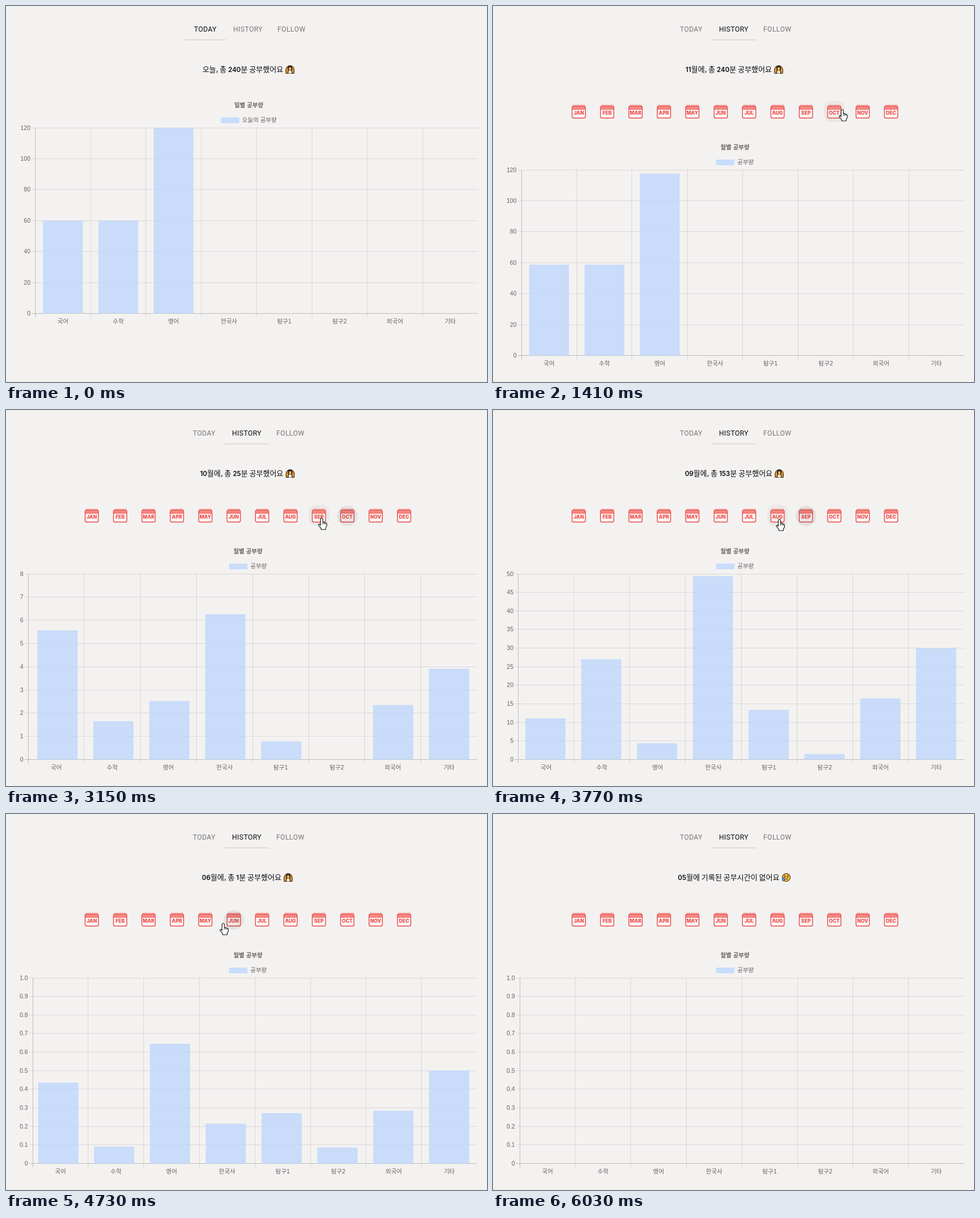
Recreate the animation shown at these times as an HTML page with a canvas. Size 847 by 661 pixels, loop 6.23 s.

```html
<!DOCTYPE html>
<html lang="ko">
<head>
<meta charset="utf-8">
<title>공부량</title>
<style>
  html, body { margin: 0; width: 100%; height: 100%; overflow: hidden; background: #f4f2f1; }
  canvas { display: block; }
</style>
</head>
<body>
<canvas id="stage" width="847" height="661"></canvas>
<script>
const ctx = document.getElementById("stage").getContext("2d");
const LOOP = 6230, TAB_CLICK = 600, HIDE_CURSOR = 6000;
const BASE = 614.5, HEIGHT = 326.5, RIGHT = 829.5;
const KOREAN = '"Noto Sans CJK KR", "Noto Sans CJK", sans-serif';
const CHART_FONT = '10.5px "Liberation Sans", ' + KOREAN;
const SUBJECTS = ["국어", "수학", "영어", "한국사", "탐구1", "탐구2", "외국어", "기타"];
const MONTHS = ["JAN", "FEB", "MAR", "APR", "MAY", "JUN", "JUL", "AUG", "SEP", "OCT", "NOV", "DEC"];

const phases = [
  { at: 643, dur: 1236, month: "11", total: 240, left: 50, max: 120, step: 20, data: [60, 60, 120, 0, 0, 0, 0, 0] },
  { at: 2759, dur: 1236, month: "10", total: 25, left: 39, max: 8, step: 1, data: [6, 1, 1, 8, 1, 0, 3, 5] },
  { at: 3418, dur: 1236, month: "09", total: 153, left: 44.5, max: 50, step: 5, data: [2, 34, 3, 50, 16, 2, 16, 30] },
  { at: 3850, dur: 800, month: "08", total: 111, left: 44.5, max: 40, step: 5, data: [17, 0, 31, 20, 14, 3, 21, 4] },
  { at: 4110, dur: 1236, month: "07", total: 23, left: 39, max: 6, step: 1, data: [5, 1, 2, 2, 3, 1, 3, 6] },
  { at: 4570, dur: 1236, month: "06", total: 1, left: 47, max: 1, step: 0.1, data: [0, 0, 1, 0, 0, 0, 0, 0] },
  { at: 5250, dur: 780, month: "05", total: 0, left: 47, max: 1, step: 0.1, data: [0, 0, 0, 0, 0, 0, 0, 0] }
];

// time, x, y of the fingertip
const cursorPath = [
  [200, 446, 7], [460, 426, 38], [890, 426, 38], [1290, 628, 178], [1410, 615, 182], [1850, 611, 184],
  [2030, 611, 184], [2600, 606, 188], [2780, 604, 188], [3100, 556, 190], [3420, 554, 191],
  [3720, 505, 192], [3860, 503, 192], [4030, 452, 193], [4120, 450, 194], [4340, 396, 194],
  [4560, 398, 193], [4980, 355, 191], [5240, 354, 191], [6000, 353, 192]
];
const clicks = [[2690, 9], [3380, 8], [3800, 7], [4060, 6], [4500, 5], [5210, 4]];
const HAND = new Path2D("M-2 2Q-2 0 0 0T2 2V7Q4 6 4.5 8Q6 7 7 9Q9 8.4 9 10.5V14L7 17V20H-1V18L-5.5 12.5Q-6 10.5-4 10.5L-2 12.5Z");

const clamp = v => Math.max(0, Math.min(1, v));
const mix = (a, b, p) => a + (b - a) * p;
const easeOut = p => 1 - (1 - clamp(p)) ** 4;
const smooth = p => p * p * (3 - 2 * p);
const crisp = v => Math.floor(v) + 0.5;

function write(text, x, y, font, color, align = "left") {
  ctx.font = font;
  ctx.fillStyle = color;
  ctx.textAlign = align;
  ctx.fillText(text, x, y);
}

function line(x1, y1, x2, y2, color, width = 1) {
  ctx.strokeStyle = color;
  ctx.lineWidth = width;
  ctx.beginPath();
  ctx.moveTo(x1, y1);
  ctx.lineTo(x2, y2);
  ctx.stroke();
}

function disc(x, y, rx, ry, fill, stroke) {
  ctx.beginPath();
  ctx.ellipse(x, y, rx, ry, 0, 0, 7);
  if (fill) { ctx.fillStyle = fill; ctx.fill(); }
  if (stroke) { ctx.strokeStyle = stroke; ctx.stroke(); }
}

function box(x, y, w, h, r) {
  ctx.beginPath();
  ctx.roundRect(x, y, w, h, r);
}

// Each update starts from wherever the bars were when it arrived.
function barState(k, t) {
  const ph = phases[k];
  const from = k ? barState(k - 1, ph.at) : { left: ph.left, heights: ph.data.map(() => 0) };
  const e = easeOut((t - ph.at) / ph.dur);
  return {
    left: mix(from.left, ph.left, e),
    heights: ph.data.map((v, i) => mix(from.heights[i], v / ph.max * HEIGHT, e))
  };
}

function drawTabs(t, active) {
  const shift = active ? -2 : 0;
  const font = "12.25px Roboto, sans-serif";
  ctx.letterSpacing = "0.35px";
  [["TODAY", 331], ["HISTORY", 400], ["FOLLOW", 478]].forEach(([name, x], i) =>
    write(name, x + shift, 45, font, i === active ? "#0c0c0c" : "#777574"));
  ctx.letterSpacing = "0px";
  const p = smooth(clamp((t - TAB_CLICK) / 220));
  line(mix(315, 385, p), 59.5, mix(387, 463, p), 59.5, "#d5d3d2", 1.6);
}

function drawCheer(x, y) {
  ctx.lineWidth = 1;
  ctx.fillStyle = "#e39a35";
  ctx.strokeStyle = "#1b120c";
  ctx.beginPath();
  ctx.moveTo(x + 1, y + 14.5);
  ctx.quadraticCurveTo(x - 1, y + 3, x + 6, y + 1);
  ctx.lineTo(x + 10, y + 1);
  ctx.quadraticCurveTo(x + 17, y + 3, x + 15, y + 14.5);
  ctx.closePath();
  ctx.fill();
  ctx.stroke();
  disc(x + 8, y + 5.5, 4.2, 4.8, "#32211a");
  disc(x + 8, y + 6.3, 2.2, 2.8, "#edb35b");
  ctx.fillStyle = "#f5eeee";
  ctx.beginPath();
  ctx.moveTo(x + 5, y + 14.5);
  ctx.lineTo(x + 6, y + 9.5);
  ctx.lineTo(x + 10, y + 9.5);
  ctx.lineTo(x + 11, y + 14.5);
  ctx.fill();
  line(x + 4.5, y + 14.5, x + 5, y + 9, "#1b120c");
  line(x + 11.5, y + 14.5, x + 11, y + 9, "#1b120c");
}

function drawSadFace(x, y) {
  ctx.lineWidth = 1;
  disc(x + 8, y + 7.5, 7, 7, "#f6b83d", "#2b1d12");
  disc(x + 5.5, y + 6.5, 1, 1.2, "#2b1d12");
  disc(x + 10.5, y + 6.5, 1, 1.2, "#2b1d12");
  line(x + 3.5, y + 4.5, x + 6, y + 3.3, "#2b1d12");
  line(x + 10, y + 3.3, x + 12.5, y + 4.5, "#2b1d12");
  ctx.beginPath();
  ctx.arc(x + 8.5, y + 12.3, 2.5, 3.5, 5.9);
  ctx.stroke();
  disc(x + 3, y + 11, 2, 3, "#42a9e5", "#25506d");
}

// Odd runs are the bold figures.
function drawMessage(runs, cx, icon) {
  const font = i => i % 2 ? "600 11.5px Inter, sans-serif" : "13px " + KOREAN;
  const widths = runs.map((s, i) => (ctx.font = font(i), ctx.measureText(s).width));
  const total = widths.reduce((a, b) => a + b, 0);
  let x = cx - (total + 20) / 2;
  runs.forEach((s, i) => {
    write(s, x, 116, font(i), "#0b0b0b");
    x += widths[i];
  });
  icon(x + 4, 104);
}

function drawMonth(i, hovered) {
  const x = 151 + 50 * i, red = "#ec4b48";
  if (hovered) {
    box(x - 18, 167, 36, 37, 12);
    ctx.fillStyle = "rgba(0,0,0,.045)";
    ctx.fill();
  }
  box(x - 11.7, 176, 23.4, 21, 2.5);
  ctx.fillStyle = "rgba(255,245,244,.55)";
  ctx.fill();
  ctx.fillStyle = "#f88d88";
  ctx.fillRect(x - 11.5, 176, 23, 5.3);
  box(x - 11.7, 176, 23.4, 21, 2.5);
  ctx.strokeStyle = red;
  ctx.lineWidth = 1.4;
  ctx.stroke();
  line(x - 11, 181.5, x + 11, 181.5, red);
  for (let k = -4; k <= 4; k++) line(x + k * 2.4 + 0.5, 173.3, x + k * 2.4 - 0.3, 178, "#f0706b", 1);
  write(MONTHS[i], x, 191.3, "800 8.6px Inter, sans-serif", red, "center");
}

function drawRipples(t) {
  for (const [at, i] of clicks) {
    const age = t - at;
    if (age < 0 || age > 550) continue;
    const fade = 1 - clamp((age - 470) / 80);
    disc(151 + 50 * i, 186, mix(10, 18, easeOut(age / 500)), mix(10, 18, easeOut(age / 500)), `rgba(0,0,0,${0.07 * fade})`);
  }
}

function drawChart(ph, bars, title, label) {
  const { left, max, step } = ph;
  const grid = "rgba(0,0,0,.105)", axis = "rgba(0,0,0,.22)", gray = "#636261";
  write(title, 426, 251.5, "bold " + CHART_FONT, gray, "center");

  ctx.font = CHART_FONT;
  const legendX = 426 - (37.5 + ctx.measureText(label).width) / 2;
  ctx.fillStyle = "#c9ddfa";
  ctx.fillRect(legendX, 270, 32.5, 10);
  write(label, legendX + 37.5, 278.3, CHART_FONT, gray);

  const ticks = Math.round(max / step);
  for (let k = 0; k <= ticks; k++) {
    const y = crisp(BASE - HEIGHT * k / ticks);
    line(left - 6, y, RIGHT, y, k ? grid : axis);
    const text = k ? (k * step).toFixed(step < 1 ? 1 : 0) : "0";
    write(text, left - 8.5, y + 3.3, CHART_FONT, gray, "right");
  }
  const slot = (RIGHT - left) / 8;
  SUBJECTS.forEach((name, i) => {
    const x = crisp(left + slot * i);
    line(x, BASE - HEIGHT, x, BASE + 6.5, i ? grid : axis);
    write(name, left + slot * (i + 0.5), 632, CHART_FONT, gray, "center");
  });

  const barSlot = (RIGHT - bars.left) / 8;
  ctx.fillStyle = "rgba(190,216,252,.8)";
  bars.heights.forEach((h, i) =>
    ctx.fillRect(bars.left + barSlot * (i + 0.14), BASE - h, barSlot * 0.72, h));
}

function cursorAt(t) {
  const next = cursorPath.findIndex(p => p[0] > t);
  if (next < 1) return null;
  const [t0, x0, y0] = cursorPath[next - 1], [t1, x1, y1] = cursorPath[next];
  const p = smooth((t - t0) / (t1 - t0));
  return { x: mix(x0, x1, p), y: mix(y0, y1, p) };
}

function drawCursor({ x, y }) {
  ctx.save();
  ctx.translate(x, y);
  ctx.fillStyle = "#fff";
  ctx.strokeStyle = "#111";
  ctx.lineWidth = 1.1;
  ctx.fill(HAND);
  ctx.stroke(HAND);
  for (const kx of [2, 4.5, 7]) line(kx, 8, kx, 11, "#111", 0.9);
  ctx.restore();
}

function drawToday() {
  drawMessage(["오늘, 총 ", "240", "분 공부했어요"], 427, drawCheer);
  const ph = phases[0];
  ctx.save();
  ctx.translate(1.5, -74);
  drawChart(ph, barState(0, ph.at + ph.dur), "일별 공부량", "오늘의 공부량");
  ctx.restore();
}

function drawHistory(t, cursor) {
  const k = phases.findLastIndex(p => p.at <= t), ph = phases[k];
  if (ph.total) drawMessage(["", ph.month, "월에, 총 ", String(ph.total), "분 공부했어요"], 425, drawCheer);
  else drawMessage(["", ph.month, "월에 기록된 공부시간이 없어요"], 425, drawSadFace);
  MONTHS.forEach((_, i) => drawMonth(i, cursor &&
    Math.abs(cursor.x - 151 - 50 * i) < 18 && Math.abs(cursor.y - 186) < 19));
  if (t < HIDE_CURSOR) drawRipples(t);
  drawChart(ph, barState(k, t), "월별 공부량", "공부량");
}

function frame(now) {
  const t = now % LOOP;
  const cursor = cursorAt(t);
  const history = t >= phases[0].at;
  ctx.fillStyle = "#f4f2f1";
  ctx.fillRect(0, 0, 847, 661);
  drawTabs(t, history ? 1 : 0);
  if (history) drawHistory(t, cursor);
  else drawToday();
  if (cursor) drawCursor(cursor);
  requestAnimationFrame(frame);
}
requestAnimationFrame(frame);
</script>
</body>
</html>
```
